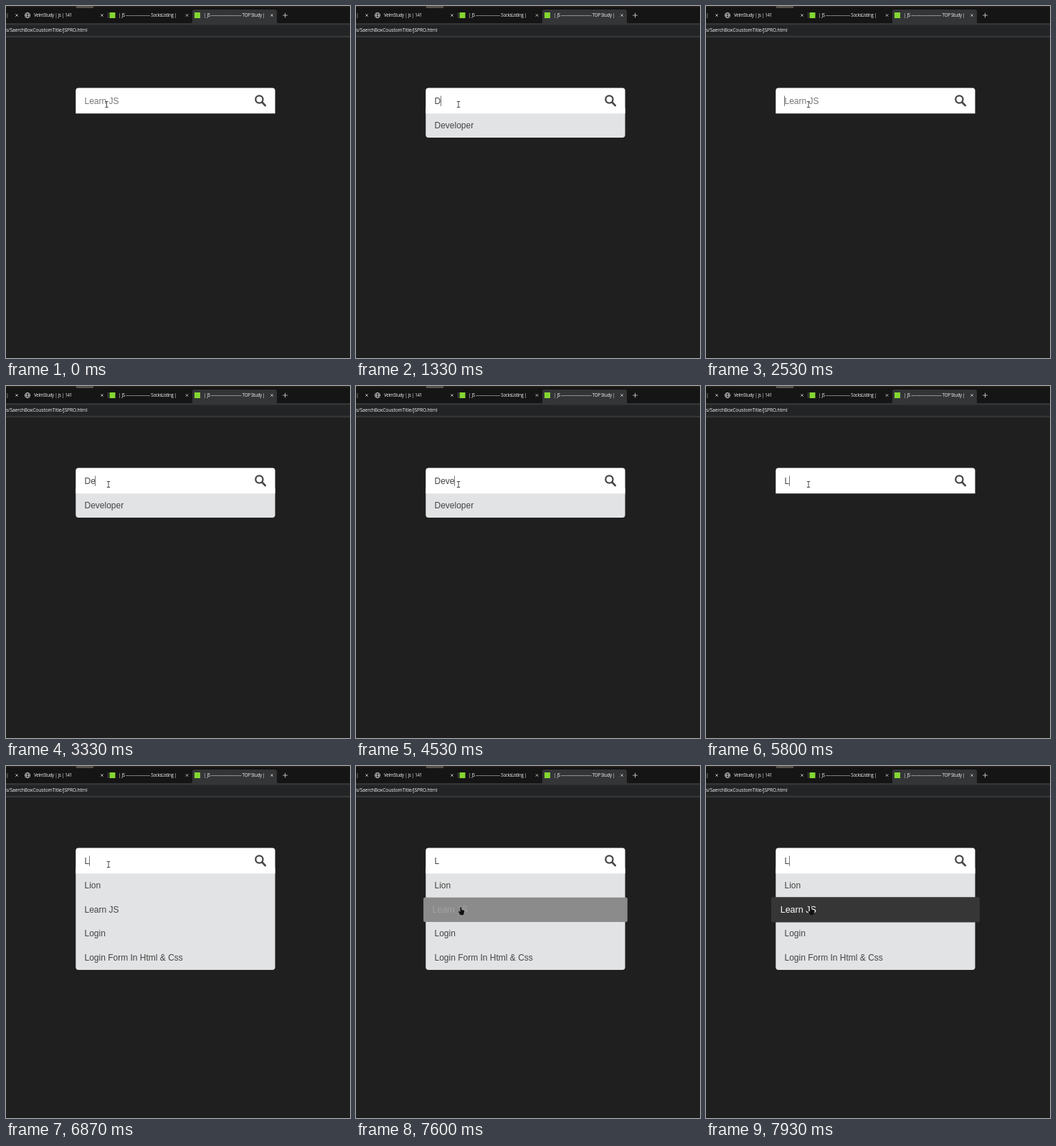
Write an HTML page that moves like this. It is 480 px wide and 492 px high and loops after 8 s.

```html
<!DOCTYPE html>
<html lang="en">
<head>
<meta charset="utf-8">
<title>Search box</title>
<style>
  html, body { margin: 0; width: 100%; height: 100%; overflow: hidden; background: #1f1f1f; }
  svg { display: block; width: 480px; height: 492px; }
  text { white-space: pre; }
  .tab { font: 500 6.2px "Open Sans", sans-serif; letter-spacing: -.3px; fill: #f4f4f4; }
  .url { font: 500 6.7px "Open Sans", sans-serif; letter-spacing: -.1px; fill: #f4f4f4; text-anchor: end; }
  .field, .row text { font: 12px "Liberation Sans", Arial, sans-serif; fill: #444; }
  .line { fill: none; stroke: #c8c8c8; stroke-width: .9; }
  .row { transform-box: view-box; transform-origin: 236.3px 200.9px; }
</style>
</head>
<body>
<svg viewBox="0 0 480 492">
  <rect width="480" height="492" fill="#1f1f1f"/>

  <!-- browser chrome -->
  <rect width="480" height="25" fill="#151515"/>
  <rect width="480" height="2" fill="#241f19"/>
  <rect x="98" width="24" height="3" fill="#55504a"/>
  <path d="M258 25q2 0 2-3V8q0-3 3-3h112q3 0 3 3v14q0 3 2 3z" fill="#343537"/>
  <rect y="24" width="480" height="20" fill="#343537"/>
  <rect y="26.5" width="480" height="15" fill="#222425"/>
  <g class="tab">
    <text x="0.3" y="15.2">|</text>
    <text x="39" y="15.2">VelmStudy | js | 141</text>
    <text x="157" y="15.2" id="tabA"></text>
    <text x="276" y="15.2" id="tabB"></text>
  </g>
  <text class="url" x="113.5" y="36.2">s/SaerchBoxCoustomTitle/JSPRO.html</text>
  <g class="line">
    <circle cx="30" cy="13" r="3.6"/>
    <ellipse cx="30" cy="13" rx="1.6" ry="3.6"/>
    <path d="M26.4 13h7.2M389.5 9.7v6.6M386.2 13h6.6"/>
    <path id="closes"/>
    <path d="M142.5 9v8" stroke="#555"/>
  </g>
  <rect x="144.5" y="9" width="8" height="8" fill="#84d632"/>
  <rect x="263" y="9" width="8" height="8" fill="#84d632"/>

  <!-- search box -->
  <rect id="panel" x="97.3" y="140" width="278.2" rx="4" fill="#e2e3e4"/>
  <path d="M97.3 150.3V118.6q0-4 4-4h270.2q4 0 4 4v31.7z" fill="#fff"/>
  <g fill="none" stroke="#474747">
    <circle cx="353.4" cy="130.5" r="5.1" stroke-width="2.3"/>
    <path d="M357.4 134.5l4.3 4.6" stroke-width="2.7" stroke-linecap="round"/>
  </g>
  <text class="field" id="field" x="109.5" y="136.8"></text>
  <rect id="caret" y="125.5" width="1" height="14.5" fill="#777"/>
  <g id="list"></g>

  <g id="beam" fill="none" stroke="#4a4a4a" stroke-width="1">
    <path d="M-2.2 -4h4.4M0 -4v8M-2.2 4h4.4"/>
  </g>
  <path id="hand" fill="#111" d="M-1.6 -5q1 -.8 1.8 .3v3.2l3 .8q1.2 .4 .9 1.8l-.8 3.4q-.4 1.2-1.6 1.2h-2q-1 0-1.5-.8l-2.4-3.4q-.3-1.2 1-1l1.6 1z"/>
</svg>

<script>
const $ = id => document.getElementById(id);
const LOOP = 8000, FRAMES = 120, ROW = 33.6, TOP = 150.5;
const words = ["Lion", "Learn JS", "Login", "Login Form In Html & Css", "Developer"];
const keys = [[0, ""], [19, "D"], [37, ""], [47, "D"], [50, "De"], [52, "Dev"], [53, "Deve"],
  [75, "Dev"], [77, "De"], [79, "D"], [81, ""], [87, "L"]];
const caretOff = [[0, 8], [16, 19], [27, 35], [42, 47], [60, 68], [95, 103], [111, 119]];
const advance = { D: .722, e: .556, v: .5, L: .556 };

const title = (n, name) => `| JS ${"-".repeat(n)} ${name} |`;
$("tabA").textContent = title(20, "SocksListing");
$("tabB").textContent = title(25, "TOP Study");
$("closes").setAttribute("d", [15, 134, 252.5, 371]
  .map(x => `M${x - 1.7} 11.3l3.4 3.4m0-3.4l-3.4 3.4`).join(""));

function el(tag, attrs, parent) {
  const node = document.createElementNS("http://www.w3.org/2000/svg", tag);
  for (const k in attrs) node.setAttribute(k, attrs[k]);
  return parent.appendChild(node);
}
const rows = [0, 1, 2, 3].map(i => {
  const g = el("g", { class: "row" }, $("list"));
  const y = TOP + ROW * i;
  const box = el("rect", { x: 97.3, y, width: 278.2, height: ROW, rx: 2, fill: "none" }, g);
  const text = el("text", { x: 109.5, y: y + 20.6 }, g);
  return { g, box, text };
});
const hot = rows[1];
$("list").append(hot.g);

const clamp = v => Math.max(0, Math.min(1, v));
const mix = (a, b, p) => Math.round(a + (b - a) * p);
const grey = v => `rgb(${v},${v},${v})`;
const typed = f => keys.filter(k => k[0] <= f).pop()[1];
const place = (node, x, y) => node.setAttribute("transform", `translate(${x} ${y})`);
const show = (node, on) => node.style.display = on ? "" : "none";

function drawList(query) {
  const found = query ? words.filter(w => w.startsWith(query)) : [];
  show($("panel"), found.length);
  $("panel").setAttribute("height", TOP - 140 + ROW * found.length);
  rows.forEach((r, i) => {
    show(r.g, i < found.length);
    r.text.textContent = found[i] || "";
  });
}

function drawHover(f) {
  const p = 1 - (1 - clamp((f - 113) / 3.5)) ** 2.1;
  hot.g.style.transform = `scale(${1 + .046 * p})`;
  hot.box.setAttribute("fill", p ? grey(mix(226, 54, p)) : "none");
  hot.text.style.fill = grey(mix(68, 255, p));
}

function drawPointer(f) {
  const a = clamp((f - 6) / 7), b = clamp((f - 103) / 11);
  const x = 140.5 + 2.5 * a + 6 * Math.sin(Math.PI * a) + 4 * b + 5 * Math.sin(2 * Math.PI * b);
  const y = 137.5 + 65 * b ** 6;
  const overList = y > TOP;
  show($("beam"), !overList);
  show($("hand"), overList);
  place($(overList ? "hand" : "beam"), x, y);
}

function render(f) {
  const text = typed(f);
  $("field").textContent = text || "Learn JS";
  $("field").style.fill = text ? "#444" : "#777";
  const width = [...text].reduce((w, c) => w + advance[c] * 12, 0);
  $("caret").setAttribute("x", Math.round(109 + width));
  show($("caret"), !caretOff.some(([from, to]) => f >= from && f < to));
  drawList(typed(Math.max(0, f - 1))); // results follow one step after the key
  drawHover(f);
  drawPointer(f);
}

const start = performance.now();
function tick() {
  const t = (performance.now() - start) % LOOP;
  render(Math.floor((t + 4) / LOOP * FRAMES) % FRAMES);
  requestAnimationFrame(tick);
}
tick();
</script>
</body>
</html>
```
